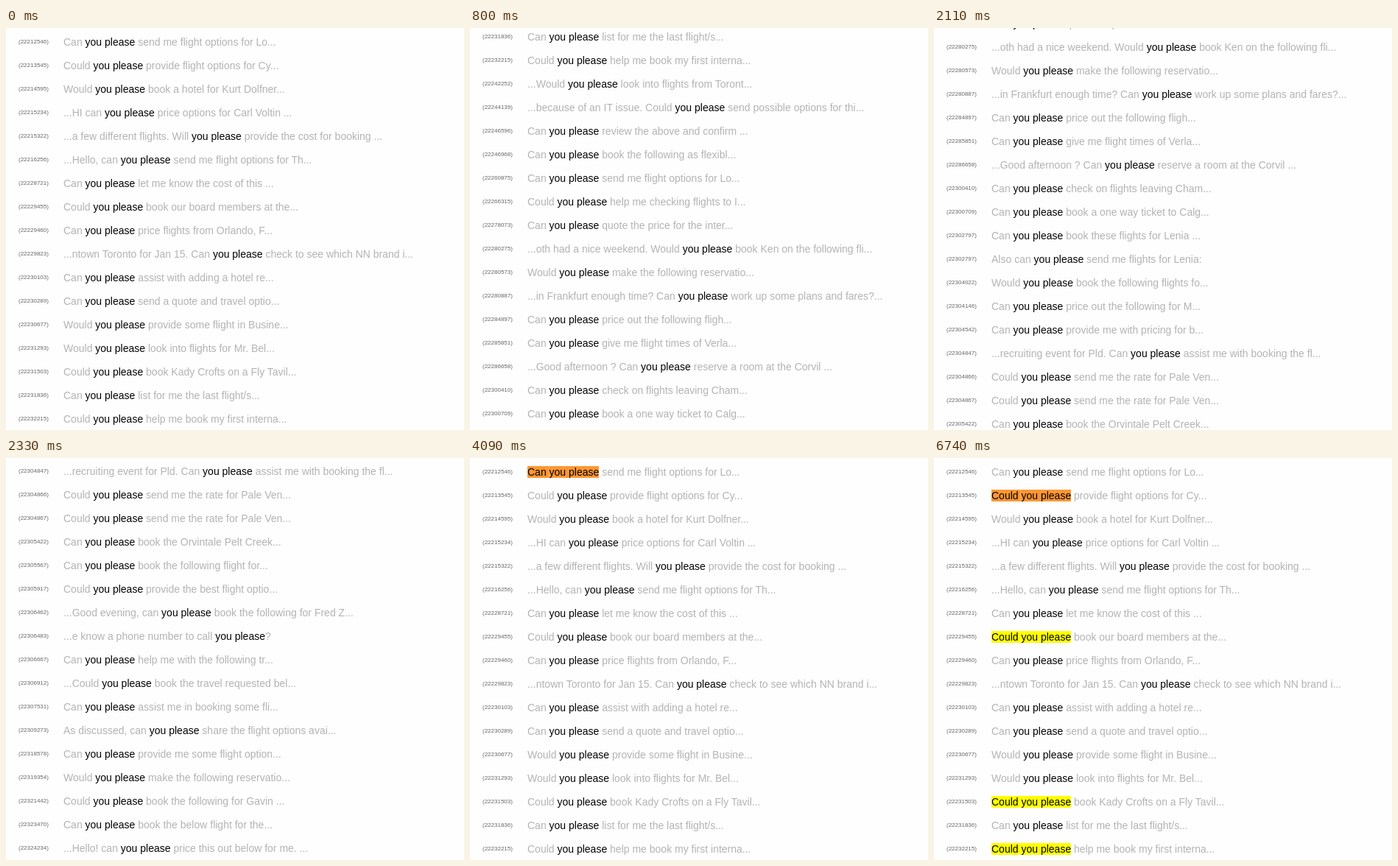
An HTML page for the animation above (8000 ms loop, 622 by 546 pixels).

```html
<!DOCTYPE html>
<html lang="en">
<head>
<meta charset="utf-8">
<title>Phrase search</title>
<style>
html, body { margin: 0; width: 100%; height: 100%; overflow: hidden; background: #fefefe; }
#stage { position: relative; width: 622px; height: 546px; overflow: hidden; }
#list { padding-top: 3px; }
.row {
  position: relative; height: 32px; padding-left: 78px; white-space: pre;
  font: 14px/32px Arial, "Liberation Sans", sans-serif; color: #b3b3b3;
}
.id { position: absolute; left: 17px; top: 0; font-size: 8px; color: #666; }
.phrase { color: #000; }
[data-find=can] .can .hit, [data-find=could] .could .hit { background: #ff0; color: #000; }
[data-find=can] .can.first .hit, [data-find=first] .can.first .hit,
[data-find=could] .could.first .hit { background: #ff9632; color: #000; }
[data-find=can] .can .word, [data-find=first] .can.first .word,
[data-find=could] .could .word { box-shadow: inset -1px 0 rgba(255, 255, 255, .25); }
</style>
</head>
<body>
<div id="stage"><div id="list"></div></div>
<script>
// Each line: id, text; "@" stands for the phrase.
const lines = `22212546 Can @ send me flight options for Lo...
22213545 Could @ provide flight options for Cy...
22214595 Would @ book a hotel for Kurt Dolfner...
22215234 ...HI can @ price options for Carl Voltin ...
22215322 ...a few different flights. Will @ provide the cost for booking ...
22216256 ...Hello, can @ send me flight options for Th...
22228721 Can @ let me know the cost of this ...
22229455 Could @ book our board members at the...
22229460 Can @ price flights from Orlando, F...
22229823 ...ntown Toronto for Jan 15. Can @ check to see which NN brand i...
22230103 Can @ assist with adding a hotel re...
22230289 Can @ send a quote and travel optio...
22230677 Would @ provide some flight in Busine...
22231293 Would @ look into flights for Mr. Bel...
22231503 Could @ book Kady Crofts on a Fly Tavil...
22231836 Can @ list for me the last flight/s...
22232215 Could @ help me book my first interna...
22242252 ...Would @ look into flights from Toront...
22244139 ...because of an IT issue. Could @ send possible options for thi...
22246596 Can @ review the above and confirm ...
22246968 Can @ book the following as flexibl...
22260875 Can @ send me flight options for Lo...
22266315 Could @ help me checking flights to I...
22278073 Can @ quote the price for the inter...
22280275 ...oth had a nice weekend. Would @ book Ken on the following fli...
22280573 Would @ make the following reservatio...
22280887 ...in Frankfurt enough time? Can @ work up some plans and fares?...
22284897 Can @ price out the following fligh...
22285851 Can @ give me flight times of Verla...
22286658 ...Good afternoon ? Can @ reserve a room at the Corvil ...
22300410 Can @ check on flights leaving Cham...
22300709 Can @ book a one way ticket to Calg...
22302797 Can @ book these flights for Lenia ...
22302797 Also can @ send me flights for Lenia:
22304022 Would @ book the following flights fo...
22304146 Can @ price out the following for M...
22304542 Can @ provide me with pricing for b...
22304847 ...recruiting event for Pld. Can @ assist me with booking the fl...
22304866 Could @ send me the rate for Pale Ven...
22304867 Could @ send me the rate for Pale Ven...
22305422 Can @ book the Orvintale Pelt Creek...
22305567 Can @ book the following flight for...
22305917 Could @ provide the best flight optio...
22306462 ...Good evening, can @ book the following for Fred Z...
22306483 ...e know a phone number to call @?
22306667 Can @ help me with the following tr...
22306912 ...Could @ book the travel requested bel...
22307531 Can @ assist me in booking some fli...
22309273 As discussed, can @ share the flight options avai...
22318578 Can @ provide me some flight option...
22319354 Would @ make the following reservatio...
22321442 Could @ book the following for Gavin ...
22323470 Can @ book the below flight for the...
22324234 ...Hello! can @ price this out below for me. ...
22325404 Can @ book a flight for Regional Pr...
22325623 ...Hello all! Can @ book these flights for Harvey...
22326811 Can @ provide a quote for me for th...
22327929 ...Can @ help me find flights for Paul...
22334546 ...Can @ look into flights for 2/5 (af...
22338015 Could @ send me the options and fares...
22339520 ...to hold the room (x4092). Can @ also ask them if they can bil...`.split("\n");

const stage = document.getElementById("stage");
const list = document.getElementById("list");
const seen = new Set();

list.innerHTML = lines.map(line => {
  const [, id, before, word = "", after] = line.match(/^(\d+) (.*?)((?:can|could) )?@(.*)$/i);
  const kind = word.trim().toLowerCase();
  const first = kind && !seen.has(kind) ? "first" : "";
  seen.add(kind);
  return `<div class="row ${kind} ${first}"><span class="id">(${id})</span>${before}` +
    `<span class="hit word">${word}</span><span class="hit phrase">you please</span>${after}</div>`;
}).join("");

const LOOP = 8000;
const scrolls = [
  { start: 500, by: 694, steps: [0, 80, 160, 220, 300, 370, 450, 530] },
  { start: 2030, by: 700, steps: [0, 70, 150, 220, 300, 380, 450, 520] }
];

// Cosine ease, sampled at the step times; it is already under way at the first step.
function scrolled({ start, by, steps }, t) {
  const step = steps.filter(s => start + s <= t).pop();
  if (step === undefined) return 0;
  const p = Math.min(1, (step + 36.2) / 532);
  return Math.round(by * (1 - Math.cos(Math.PI * p)) / 2);
}

function findAt(t) {
  if (t < 4090) return "";
  if (t < 4170) return "first";
  return t < 6740 ? "can" : "could";
}

const begin = performance.now();
function draw() {
  const t = (performance.now() - begin) % LOOP;
  const y = t < 4090 ? scrolls.reduce((sum, s) => sum + scrolled(s, t), 0) : 0;
  list.style.transform = `translateY(${-y}px)`;
  stage.dataset.find = findAt(t);
  requestAnimationFrame(draw);
}
draw();
</script>
</body>
</html>
```
